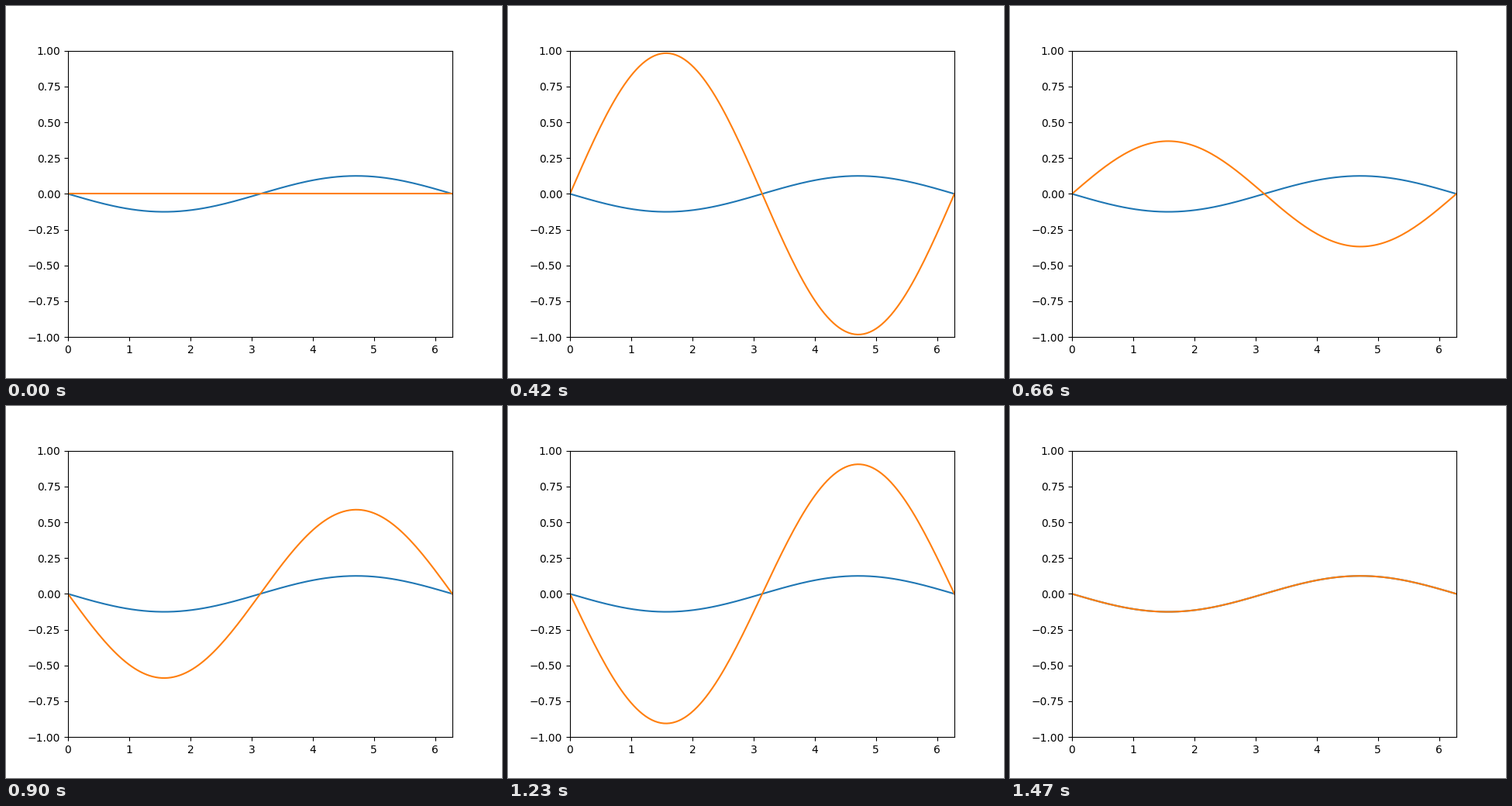
These frames come from a looping animation (640x480 px, 1.5 s). A matplotlib script:

```python
import numpy as np
import matplotlib.pyplot as plt
from matplotlib.animation import FuncAnimation

FRAMES = 50
INTERVAL = 30  # ms

x = np.linspace(0, 2 * np.pi, 128)


def wave(i):
    """Standing wave at step i of the cycle."""
    return np.sin(2 * np.pi * i / FRAMES) * np.sin(x)


fig, ax = plt.subplots(figsize=(6.4, 4.8), dpi=100)
ax.set_xlim(0, 2 * np.pi)
ax.set_ylim(-1, 1)

ax.plot(x, wave(FRAMES - 1), color="tab:blue")
moving, = ax.plot(x, wave(0), color="tab:orange")


def update(i):
    moving.set_ydata(wave(i))
    return moving,


anim = FuncAnimation(fig, update, frames=FRAMES, interval=INTERVAL,
                     repeat=True, repeat_delay=0)
plt.show()
```
